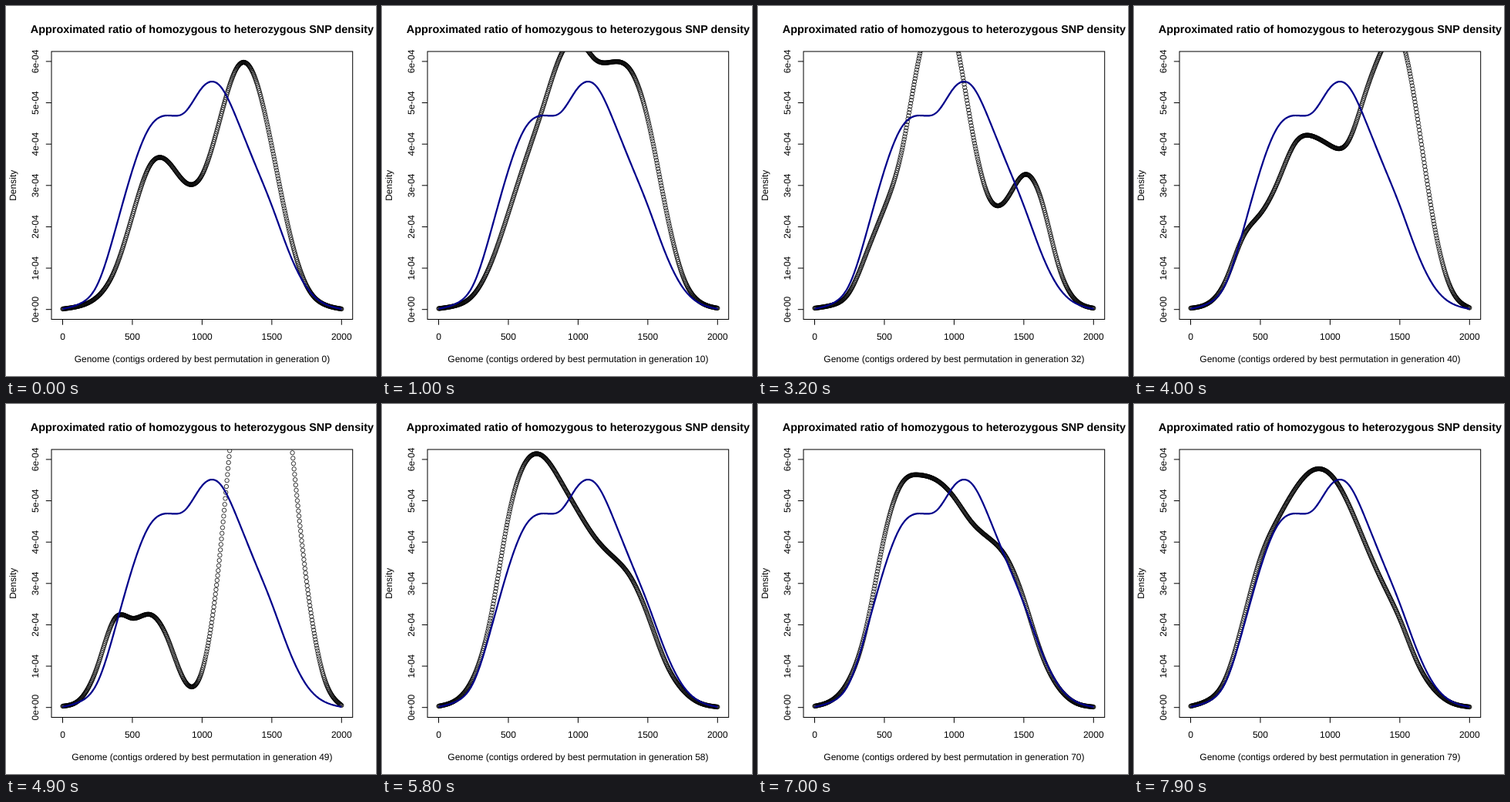
An HTML page that plays this animation: 480x480 px, repeating every 8 s.

```html
<!DOCTYPE html>
<html lang="en">
<head>
<meta charset="utf-8">
<title>SNP density ratio by generation</title>
<style>
html, body { margin: 0; width: 100%; height: 100%; overflow: hidden; background: #fff; }
svg { display: block; width: 480px; height: 480px; }
text {
  font: 12px "Liberation Sans", Arial, Helvetica, sans-serif;
  text-anchor: middle;
  text-rendering: geometricPrecision;
}
.title { font-size: 14.4px; font-weight: bold; }
</style>
</head>
<body>
<svg viewBox="0 0 480 480">
  <defs><clipPath id="area"><rect x="59" y="59" width="391" height="348"/></clipPath></defs>
  <g id="axes" fill="none" stroke="#000" stroke-width="1">
    <rect x="59" y="59" width="390.7" height="347.5"/>
  </g>
  <g id="labels">
    <text class="title" x="254.4" y="34.8">Approximated ratio of homozygous to heterozygous SNP density</text>
    <text transform="translate(13 232.8) rotate(-90)">Density</text>
    <text id="caption" x="254.4" y="461.5"></text>
  </g>
  <g clip-path="url(#area)" fill="none">
    <g id="dots" stroke="#000" stroke-width="0.8"></g>
    <path id="goal" stroke="#00008b" stroke-width="2.25" stroke-linejoin="round"/>
  </g>
</svg>
<script>
const NS = 'http://www.w3.org/2000/svg';
const LEFT = 73.5, WIDTH = 361.8, BASE = 393.7, UNIT = 53.63;
const COUNT = 512, STEP = 100, GENERATIONS = 80;
const byId = id => document.getElementById(id);

// Curve heights in pixels, at 17 evenly spaced places along the genome
const expected = [393, 386, 361, 292, 213, 157, 142, 138, 106, 103, 147, 203, 259, 320, 365, 386, 393];
const keys = [
  { gen: 0,  y: [393, 389, 377, 342, 272, 207, 201, 228, 219, 149, 80, 91, 182, 292, 363, 387, 393] },
  { gen: 20, y: [392, 388, 372, 325, 265, 190, 60, -100, -130, -10, 65, 75, 112, 226, 336, 381, 391] },
  { gen: 32, y: [392, 388, 371, 319, 262, 188, 66, 0, 34, 157, 248, 251, 219, 251, 337, 382, 392] },
  { gen: 49, y: [392, 383, 340, 278, 278, 273, 303, 359, 346, 200, -35, -165, -165, 22, 231, 355, 391] },
  { gen: 58, y: [392, 384, 354, 275, 147, 75, 68, 100, 139, 174, 198, 224, 274, 334, 371, 388, 393] },
  { gen: 70, y: [392, 384, 356, 286, 172, 103, 92, 99, 121, 153, 174, 199, 253, 323, 368, 388, 393] },
  { gen: 79, y: [392, 384, 356, 282, 200, 149, 110, 86, 91, 127, 180, 231, 279, 335, 371, 388, 393] }
];

function make(tag, attrs, parent) {
  const el = document.createElementNS(NS, tag);
  for (const k in attrs) el.setAttribute(k, attrs[k]);
  parent.appendChild(el);
  return el;
}

// Natural cubic spline over evenly spaced values, u in 0..1
function spline(v) {
  const n = v.length - 1, m = v.map(() => 0);
  for (let pass = 0; pass < 16; pass++)
    for (let i = 1; i < n; i++)
      m[i] = (6 * (v[i + 1] - 2 * v[i] + v[i - 1]) - m[i - 1] - m[i + 1]) / 4;
  return u => {
    const i = Math.min(n - 1, Math.floor(u * n)), b = u * n - i, a = 1 - b;
    return a * v[i] + b * v[i + 1] + ((a ** 3 - a) * m[i] + (b ** 3 - b) * m[i + 1]) / 6;
  };
}

function heights(gen) {
  const i = Math.max(1, keys.findIndex(k => k.gen >= gen));
  const a = keys[i - 1], b = keys[i];
  const p = (gen - a.gen) / (b.gen - a.gen);
  return a.y.map((y, j) => y + (b.y[j] - y) * p);
}

for (let i = 0; i <= 4; i++) {
  const x = LEFT + WIDTH * i / 4;
  make('path', { d: `M${x} 406.5v7.2` }, byId('axes'));
  make('text', { x, y: 433 }, byId('labels')).textContent = i * 500;
}
for (let i = 0; i <= 6; i++) {
  const y = BASE - UNIT * i;
  make('path', { d: `M59 ${y}h-7.2` }, byId('axes'));
  make('text', { transform: `translate(41.8 ${y}) rotate(-90)` }, byId('labels')).textContent =
    i ? `${i}e-04` : '0e+00';
}

const places = Array.from({ length: COUNT }, (_, i) => i / (COUNT - 1));
const dots = places.map(u => make('circle', { cx: LEFT + WIDTH * u, r: 2.7 }, byId('dots')));
const goal = spline(expected);
byId('goal').setAttribute('d', 'M' + places.map(u =>
  `${(LEFT + WIDTH * u).toFixed(2)} ${goal(u).toFixed(2)}`).join('L'));

let shown = -1;
function draw(gen) {
  if (gen === shown) return;
  shown = gen;
  const curve = spline(heights(gen));
  dots.forEach((dot, i) => dot.setAttribute('cy', curve(places[i]).toFixed(2)));
  byId('caption').textContent = `Genome (contigs ordered by best permutation in generation ${gen})`;
}

const start = performance.now();
function tick() {
  draw(Math.floor((performance.now() - start) / STEP) % GENERATIONS);
  requestAnimationFrame(tick);
}
draw(0);
requestAnimationFrame(tick);
</script>
</body>
</html>
```
